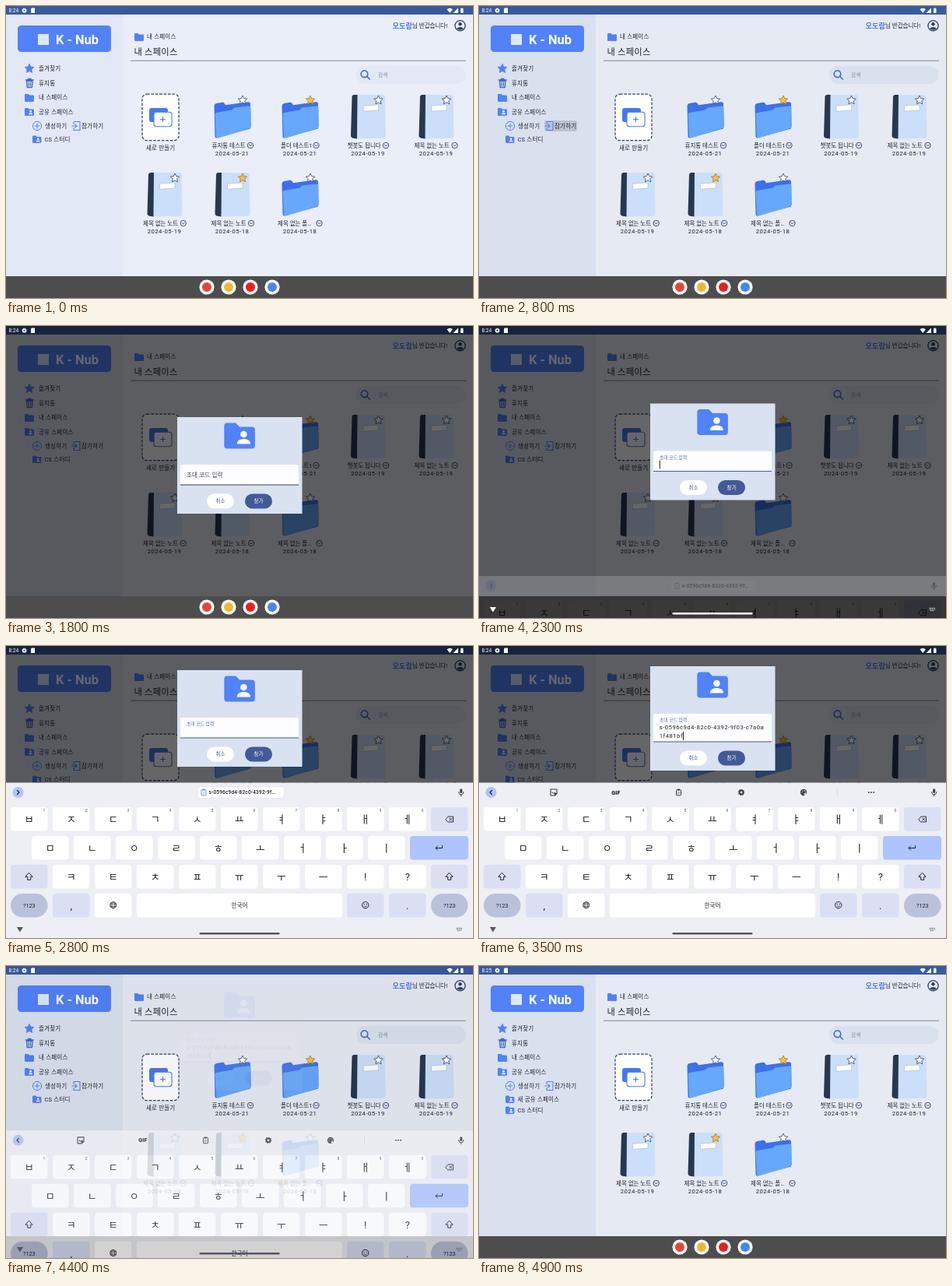
These frames come from a looping animation (600 px wide and 375 px high, 5000 ms). An HTML page:

```html
<!DOCTYPE html>
<html lang="ko">
<head>
<meta charset="utf-8">
<style>
html, body { margin: 0; width: 100%; height: 100%; overflow: hidden; background: #e6eaf3; }
svg { display: block; width: 100vw; height: 100vh; }
text { font-family: Roboto, "Noto Sans CJK KR", "Noto Sans CJK", sans-serif; letter-spacing: .2px; white-space: pre; }
.latin { letter-spacing: .47px; }
.tight { letter-spacing: 0; }
.mid { text-anchor: middle; }
.line { fill: none; stroke-linecap: round; stroke-linejoin: round; }
</style>
</head>
<body>
<svg id="stage" viewBox="0 0 600 375"></svg>
<script>
const BLUE = '#5182fa', NAVY = '#435a98', INK = '#20242c', DARK = '#2b3f6b';
const stage = document.getElementById('stage');

// Shape helpers; text is placed by its vertical centre.
const txt = (x, y, s, size = 7.5, fill = INK, cls = '', more = '') =>
  `<text x="${x}" y="${y + size * .37}" font-size="${size}" fill="${fill}" class="${cls}" ${more}>${s}</text>`;
const rect = (x, y, w, h, fill, r = 0, more = '') =>
  `<rect x="${x}" y="${y}" width="${w}" height="${h}" rx="${r}" fill="${fill}" ${more}/>`;
const circ = (x, y, r, fill, more = '') => `<circle cx="${x}" cy="${y}" r="${r}" fill="${fill}" ${more}/>`;
const fill = (d, color, more = '') => `<path d="${d}" fill="${color}" ${more}/>`;
const line = (d, color, w = 1) => `<path d="${d}" class="line" stroke="${color}" stroke-width="${w}"/>`;
const group = (id, body) => `<g id="${id}">${body}</g>`;
const at = (x, y, body, k = 1) => `<g transform="translate(${x} ${y}) scale(${k})">${body}</g>`;

function star(x, y, r, color, edge) {
  const pts = Array.from({ length: 10 }, (_, i) => {
    const a = i * Math.PI / 5, q = i % 2 ? r * .48 : r;
    return [(x + q * Math.sin(a)).toFixed(2), (y - q * Math.cos(a)).toFixed(2)];
  });
  return `<polygon points="${pts.join(' ')}" fill="${color}" stroke="${edge}" stroke-width=".9" stroke-linejoin="round"/>`;
}

function folder(x, y, k, shared) {
  const person = circ(7.6, 4.4, 1.3, '#fff') + fill('M5 8.2q0-2 2.6-2t2.6 2z', '#fff');
  return at(x, y, fill('M0 1.2Q0 0 1.2 0H4.5L6 1.5h4.8q1.2 0 1.2 1.2v6.1q0 1.2-1.2 1.2H1.2Q0 10 0 8.8z', BLUE) +
    (shared ? person : ''), k);
}

const gear = (x, y, r, color) =>
  circ(x, y, r * .6, 'none', `stroke="${color}" stroke-width="${r * .5}"`) +
  circ(x, y, r * .85, 'none', `stroke="${color}" stroke-width="${r * .4}" stroke-dasharray="${r * .33}"`);

// Cards, drawn around their column centre and the row top.
const bigFolder =
  fill('M-23 16q0-3 3-3.500l7-1.200q2-.3 3 1.300l1.500 2.200 29-4q3-.4 3 2.500V45L-20 57q-2 0-2-2z', '#3c70ee') +
  fill('M-22 27q0-2 2-2.500l20-3.500 3-3 18-2q3-.3 3 2l.5 24q0 2-2 2.500l-40 12.500q-3 .7-3-2z', '#66a8fc');
const notebook =
  fill('M-14 1.500H19q3 0 3 3L23 54q0 3-3 3.200L-15 58z', '#cbdffa') +
  fill('M-18 1.500h4.500L-14 58q-8-.5-8-3.500L-20.500 4q.2-2.500 2.500-2.500z', '#27374f') +
  fill('M-6 15.500l19.500-1v7l-19.500 1.200z', '#fff', 'stroke="#9fb6d8" stroke-width=".6"');

const card = ([x, y, kind, name, left, arrow, day, starred]) =>
  at(x, y, kind) + star(x + 13.5, y + 8.5, 6, starred ? '#f9c03c' : '#fff', starred ? '#a8823a' : '#43516c') +
  txt(left, y + 66.5, name, 7.5, INK, 'tight') +
  circ(arrow, y + 66.5, 3.7, 'none', `stroke="${DARK}" stroke-width=".9"`) +
  line(`M${arrow - 1.7} ${y + 65.7}l1.700 1.700 1.700-1.700`, DARK, .9) +
  txt(x, y + 76.7, '2024-05-' + day, 7.7, INK, 'latin mid');

const cards = [
  [290.5, 112.5, bigFolder, '휴지통 테스트', 264.5, 314, 21],
  [377.5, 112.5, bigFolder, '폴더 테스트1', 353, 398.5, 21, 1],
  [465, 112.5, notebook, '챗봇도 됩니다', 438.5, 488, 19],
  [552.5, 112.5, notebook, '제목 없는 노트', 524.5, 576.5, 19],
  [203.5, 212.5, notebook, '제목 없는 노트', 176, 227.7, 19],
  [290.5, 212.5, notebook, '제목 없는 노트', 263.5, 315, 18, 1],
  [377.5, 212.5, bigFolder, '제목 없는 폴…', 349, 402.5, 18]
];

const statusIcons =
  txt(3.5, 6, '8:24', 6.6, '#fff', 'tight', 'id="clock"') +
  gear(23.5, 5.7, 3, '#fff') +
  fill('M33 2.500h4v6.500h-5v-5.200z', '#fff') +
  fill('M566.500 4.200q3.700-3 7.400 0l-3.700 4.800z', '#fff') +
  fill('M581 2.500V9h-6.500z', '#fff') +
  fill('M584 3.200h1v-.8h1.500v.8h1V9H584z', '#fff');

const sidebar =
  rect(15, 25, 120, 34, BLUE, 4.5) +
  rect(41, 36, 14, 14, '#dce8fb') +
  txt(64, 43, 'K - Nub', 16.4, '#fff', 'tight', 'font-weight="700"') +
  star(30, 80.5, 6.2, BLUE, BLUE) + txt(42, 80, '즐겨찾기') +
  line('M26.500 96.500l.6 8h6.300l.6-8zM25.300 95h10M28.500 95v-1.500h3.500V95M29 98.500v4M31.500 98.500v4', '#4369c8', 1.3) +
  txt(42, 99, '휴지통') +
  folder(24, 113, 1) + txt(42, 117.5, '내 스페이스') +
  folder(24, 131, 1, 1) + txt(42, 136.5, '공유 스페이스') +
  rect(84, 147, 42, 14, '#000', 2, 'id="press" opacity="0"') +
  circ(40, 154, 5.6, 'none', `stroke="${BLUE}" stroke-width="1"`) + line('M37 154h6M40 151v6', BLUE) +
  txt(50, 154, '생성하기') +
  line('M87 151.500V148.500h8v11h-8v-3M84.800 154h6M88.800 151.800l2.200 2.200-2.200 2.200', BLUE, 1.1) +
  txt(97, 154, '참가하기') +
  group('added', folder(34, 166.5, .95, 1) + txt(49.5, 171, '새 공유 스페이스')) +
  group('study', folder(34, 166.5, .95, 1) + txt(49.5, 171, 'CS 스터디'));

const page =
  rect(0, 0, 600, 375, '#e6eaf3') + rect(0, 11, 150, 336, '#d9e1ef') +
  rect(450, 77, 140.5, 23, '#d9e1ef', 11) +
  rect(0, 11, 600, 336, '#eef3ff', 0, 'id="wash"') +
  rect(0, 0, 600, 11, '#3a5a9f') + sidebar +
  txt(496.5, 25.5, '오도람', 9.2, '#4678ee', 'tight', 'font-weight="700"') +
  txt(522, 25.5, '님 반갑습니다!', 7.5, INK, 'tight') +
  circ(583.5, 25.3, 6.6, 'none', `stroke="${DARK}" stroke-width="1.3"`) +
  circ(583.5, 23.2, 2.2, DARK) + fill('M579 28.800q4.500-3.800 9 0-4.500 4-9 0z', DARK) +
  folder(165, 35, 1) + txt(181, 39.5, '내 스페이스') +
  txt(164.5, 59, '내 스페이스', 11.3) +
  rect(160, 69.8, 431, .9, '#777c86') +
  circ(460.5, 87.3, 4.3, 'none', 'stroke="#4268c6" stroke-width="1.6"') + line('M463.800 90.500l3.500 3.500', '#4268c6', 1.7) +
  txt(478, 88.5, '검색', 6.6, '#858b96') +
  rect(175, 113.2, 47, 59.5, '#fff', 6, `stroke="${DARK}" stroke-width="1.2" stroke-dasharray="3.600 1.800"`) +
  rect(184, 131, 24, 18, '#477af2', 3) +
  rect(190, 136.3, 23, 18.5, '#fff', 3, 'stroke="#477af2" stroke-width="1.1"') +
  line('M198.500 145.500h6M201.500 142.500v6', '#477af2', 1.1) +
  txt(198.7, 182, '새로 만들기', 7.5, INK, 'mid') +
  cards.map(card).join('');

const CODE = 's-0596c9d4-82c0-4392-9f03-c7a0a1f481bf';
const dialog =
  rect(0, 0, 160.5, 124, '#d9e2f1', 0, 'id="panel"') +
  folder(60.3, 7.5, 3.3, 1) +
  rect(4, 61, 152, 26, '#fdfdff', 1.5, 'id="field"') +
  rect(4, 86.5, 152, 1, '#3a3f4a', 0, 'id="under"') +
  txt(12, 74, '초대 코드 입력', 7.5, '#3e434d', '', 'id="hint"') +
  group('label', txt(12, 69, '초대 코드 입력', 5.6, '#4a629f')) +
  rect(11.8, 73, 1, 11, '#222', 0, 'id="caret"') +
  group('code', txt(11.8, 78, CODE.slice(0, 31), 7.7, INK, 'latin') + txt(11.8, 89, CODE.slice(31), 7.7, INK, 'latin')) +
  group('buttons',
    rect(38, 98.5, 35, 19, '#fff', 9.5) + txt(55.5, 108, '취소', 6.5, NAVY, 'mid tight', 'font-weight="500"') +
    rect(87, 98.5, 35, 19, NAVY, 9.5) + rect(87, 98.5, 35, 19, '#fff', 9.5, 'id="tap"') +
    txt(104.5, 108, '참가', 6.5, '#fff', 'mid tight', 'font-weight="500"'));

// Keyboard: columns every 54 px, rows every 37 px.
const LAV = '#dadff4', SOFT = '#bac2db', GREY = '#3b3e46', KEY = '#1f2126';
const key = (x, row, s, color = '#fff', w = 47.5, size = 13, r = 4) =>
  rect(x, 207 + row * 37, w, 30.5, color, r) +
  (s ? txt(x + w / 2, 222.3 + row * 37, s, size, KEY, 'mid tight') : '');
const keyRow = (x, row, s) => [...s].map((c, i) => key(x + i * 54, row, c)).join('');
const shift = x => key(x, 2, '', LAV) + line(`M${x + 23.7} 291.500l4.500 4.800h-2.500v4h-4v-4h-2.500z`, KEY);
const clip = (x, y, color) => rect(x - 3, y - 3.3, 6, 7.2, 'none', .8, `stroke="${color}" stroke-width="1"`) +
  rect(x - 1.6, y - 4.4, 3.2, 2, color) + line(`M${x - 1.3} ${y}h2.600M${x - 1.3} ${y + 1.8}h2`, color, .6);
const mode = d => circ(15.5, 188, 7, '#adc4fd') + line(d, KEY, 1.2);

const keyboard =
  rect(0, 175.5, 600, 200, '#eeeff4') +
  group('chipBar', mode('M14.500 185.500l2.500 2.500-2.500 2.500') +
    rect(246, 180.5, 111.5, 15, '#fff', 4, 'stroke="#dfe1e8" stroke-width=".6"') + clip(254, 188, '#7d96d0') +
    txt(260.5, 188, CODE.slice(0, 23) + '…', 6.5, KEY, '', 'font-weight="500"')) +
  group('toolBar', mode('M16.500 185.500l-2.500 2.500 2.500 2.500') +
    line('M92 184h8v5.500l-2.500 2.500H92zM97.500 192v-2.500h2.500M94 188q2 2.500 4 0', GREY, 1.1) +
    txt(176, 188, 'GIF', 7, KEY, 'mid', 'font-weight="800"') +
    clip(256.5, 188, GREY) + gear(337, 188, 4, GREY) +
    circ(417, 188, 4.2, GREY) + [[-2, 0], [-1, -2], [1.3, -2], [2.4, 0]].map(([x, y]) => circ(417 + x, 188 + y, .7, '#eeeff4')).join('') +
    circ(419, 190.5, 1.4, '#eeeff4') + rect(460, 183, .7, 10, '#d0d3da') +
    [500.8, 504, 507.2].map(x => circ(x, 188, 1, GREY)).join('')) +
  rect(583.2, 183.3, 3, 5.8, GREY, 1.5) + line('M581.500 187.500q.4 3.500 3.200 3.500t3.200-3.500M584.700 191v1.800', GREY, 1) +
  keyRow(6, 0, 'ㅂㅈㄷㄱㅅㅛㅕㅑㅐㅔ') +
  [...'1234567890'].map((c, i) => txt(49 + i * 54, 211.5, c, 5, '#555', 'mid tight')).join('') +
  key(546, 0, '', LAV) + line('M565 222.500l3-3.500h6.500v7H568zM569.800 221l3 3M572.800 221l-3 3', KEY, .9) +
  keyRow(33, 1, 'ㅁㄴㅇㄹㅎㅗㅓㅏㅣ') +
  key(519, 1, '', '#adc4fd', 75) + line('M560.500 256.500v3h-8M554.500 257l-2.500 2.500 2.500 2.500', KEY) +
  shift(6) + keyRow(60, 2, 'ㅋㅌㅊㅍㅠㅜㅡ!?') + shift(546) +
  key(6, 3, '?123', SOFT, 47.5, 7.2, 15) + key(60, 3, ',', LAV) + key(114, 3, '') +
  circ(137.7, 332.7, 4, 'none', `stroke="${KEY}" stroke-width=".9"`) +
  `<ellipse cx="137.700" cy="332.700" rx="1.800" ry="4" fill="none" stroke="${KEY}" stroke-width=".7"/>` +
  line('M134 331.300h7.400M134 334.200h7.400', KEY, .7) +
  key(168, 3, '한국어', '#fff', 264, 7.6) + key(438, 3, '', LAV) +
  circ(461.7, 332.7, 4.2, 'none', `stroke="${KEY}" stroke-width="1"`) +
  circ(460.2, 331.5, .7, KEY) + circ(463.2, 331.5, .7, KEY) + line('M459.700 334q2 2 4 0', KEY, .8) +
  key(492, 3, '.', LAV) + key(546, 3, '?123', SOFT, 47.5, 7.2, 15);

const nav = c => fill('M13.800 361h8.200l-4.100 6.500z', c) + rect(248.5, 368, 103, 2.6, c, 1.3) +
  `<path d="M578.500 362.300h7.500M578.500 364h7.500M580 365.700h4.500" stroke="${c}" stroke-width=".9" stroke-dasharray="1 .6"/>`;

const taskbar = rect(0, 347, 600, 28, '#4d4d4d') +
  ['#e2453a', '#efb92f', '#f01c1c', '#4387f0'].map((c, i) =>
    circ(258 + i * 28, 361, 9.6, '#fff') + circ(258 + i * 28, 361, 6, c)).join('');

stage.innerHTML = page +
  rect(0, 0, 600, 375, '#000', 0, 'id="scrim"') + statusIcons +
  group('dialog', dialog) +
  rect(0, 347, 600, 28, '#060606', 0, 'id="navBar"') +
  group('keyboard', keyboard) +
  group('navLight', nav('#55585f')) +
  group('navDark', nav('#fff')) +
  group('taskbar', taskbar);

const el = {};
stage.querySelectorAll('[id]').forEach(n => el[n.id] = n);
const set = (id, name, v) => el[id].setAttribute(name, v);
const alpha = (id, v) => set(id, 'opacity', +v);
const move = (id, x, y) => set(id, 'transform', `translate(${x} ${y})`);
const ramp = (t, a, b) => Math.max(0, Math.min(1, (t - a) / (b - a)));
const ease = (t, a, b) => { const k = ramp(t, a, b); return k * k * (3 - 2 * k); };

function draw(t) {
  const focus = t >= 2170, pasted = t >= 3300, joined = t >= 4500;
  const grow = pasted ? 10 : 0;
  const shown = ease(t, 950, 1080) - ease(t, 4300, 4420);
  const rise = ease(t, 2175, 2610), fall = ease(t, 4320, 4620);
  const keys = ease(t, 2145, 2600) - fall;

  alpha('wash', .4 * (1 - ramp(t, 0, 600)));
  el.clock.textContent = joined ? '8:25' : '8:24';
  alpha('press', .13 * (ramp(t, 650, 750) - ramp(t, 1150, 1350)));
  alpha('added', joined);
  move('study', 0, joined ? 14 : 0);

  alpha('scrim', .6 * shown);
  alpha('dialog', shown);
  move('dialog', 220, 117 - 86 * rise - grow / 2);
  set('panel', 'height', 124 + grow);
  set('field', 'height', 26 + grow);
  set('under', 'y', 86.5 + grow);
  set('under', 'fill', t >= 2250 ? '#3f5cae' : '#3a3f4a');
  move('buttons', 0, grow);
  alpha('hint', !focus);
  alpha('label', focus);
  alpha('code', pasted);
  alpha('caret', focus && (t - (pasted ? 3300 : 2200)) % 1000 < 500);
  set('caret', 'x', pasted ? 42 : 11.8);
  set('caret', 'y', pasted ? 84 : 73);
  alpha('tap', .14 * ramp(t, 4100, 4200));

  move('keyboard', 0, 200 * (1 - keys));
  alpha('keyboard', rise - fall);
  alpha('chipBar', !pasted);
  alpha('toolBar', pasted);
  const bar = t < 2180 || t >= 4600;
  alpha('taskbar', bar);
  alpha('navBar', !bar);
  alpha('navDark', bar ? 0 : 1 - ramp(keys, .3, .7));
  alpha('navLight', bar ? 0 : ramp(keys, .3, .7));
}

function frame() {
  draw(performance.now() % 5000);
  requestAnimationFrame(frame);
}
frame();
</script>
</body>
</html>
```
